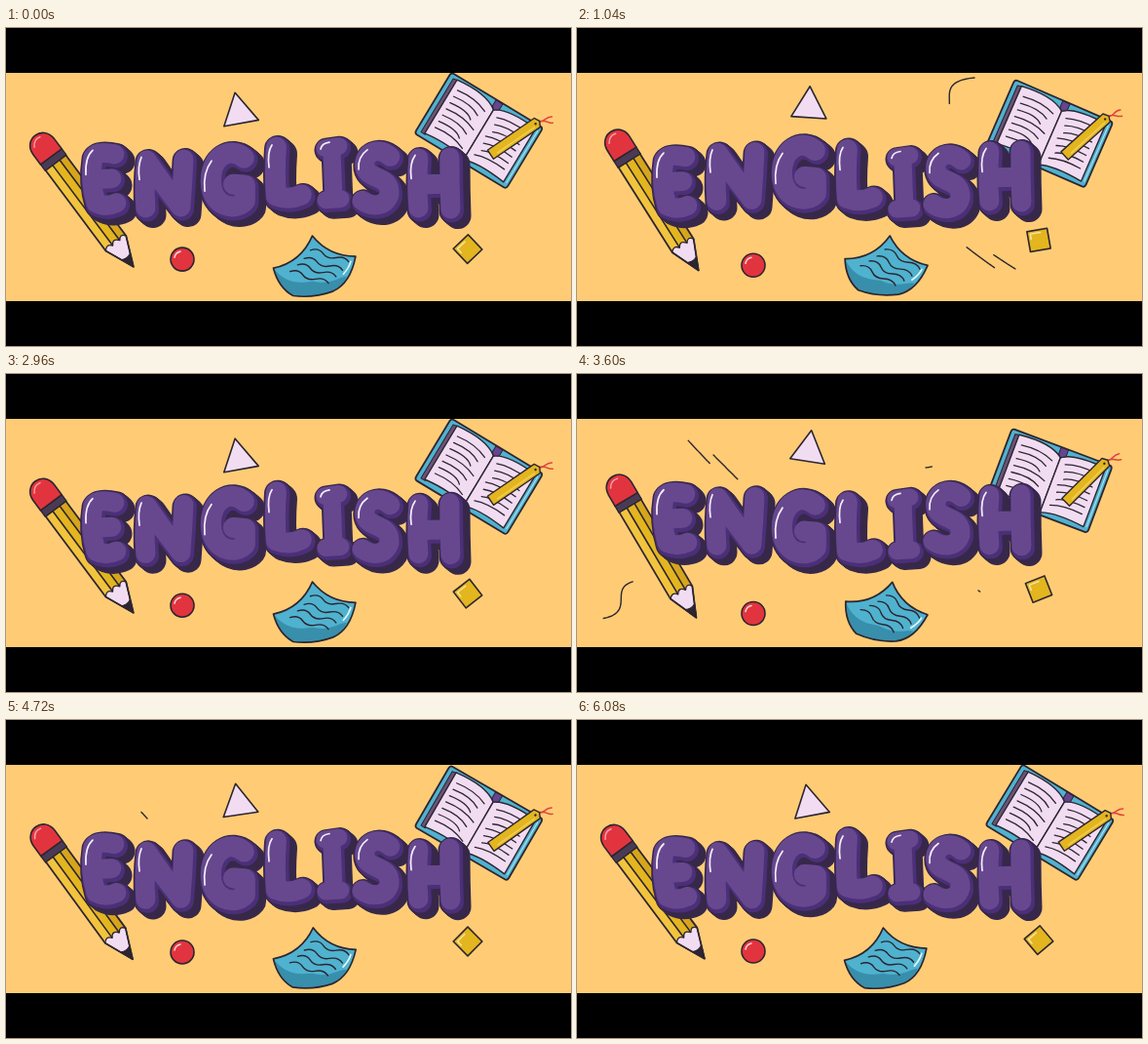
These frames come from a looping animation (580x326 px, 6160 ms). An HTML page with a canvas:

```html
<!DOCTYPE html>
<html lang="en">
<head>
<meta charset="utf-8">
<title>English</title>
<style>
html, body { margin: 0; width: 100%; height: 100%; overflow: hidden; background: #000; }
canvas { display: block; width: 580px; height: 326px; }
</style>
</head>
<body>
<canvas id="stage" width="580" height="326"></canvas>
<script>
const ctx = document.getElementById('stage').getContext('2d');
const LOOP = 6160, CYCLE = LOOP / 4, STEP = 80, TAU = Math.PI * 2;
const INK = '#2d2530', PAGE = '#f1dcf2', BLUE = '#4fb2cf', YELLOW = '#e3b51f';

const wave = x => Math.cos(TAU * x);
const clamp = x => Math.max(0, Math.min(1, x));

function shape(d, fill, stroke, width = 1.6) {
  const path = new Path2D(d);
  if (fill) { ctx.fillStyle = fill; ctx.fill(path); }
  if (stroke) { ctx.strokeStyle = stroke; ctx.lineWidth = width; ctx.stroke(path); }
}

// Draw in a moved and turned coordinate system.
function at(x, y, deg, draw) {
  ctx.save();
  ctx.translate(x, y);
  ctx.rotate(deg * Math.PI / 180);
  draw();
  ctx.restore();
}

// Bubble letters: strokes, highlight, stroke width.
const letters = [
  ['M113 130Q95 126 91 133Q87 157 94 180Q104 185 115 180M92 156L110 155', 'M82 149Q81 131 89 124', 24],
  ['M145 181Q143 155 146 132Q162 156 181 180Q183 156 184 131', 'M137 150Q135 136 139 127', 24],
  ['M246 133C231 120 212 132 212 156C212 184 238 188 247 177L247 161L235 160', 'M204 165Q202 146 211 134', 25],
  ['M279 128Q277 154 279 178Q292 183 305 177', 'M270 147Q268 131 273 124', 25],
  ['M329 130L343 128M336 130L338 180M330 183L345 182', 'M323 129Q324 123 332 122', 22],
  ['M396 133C383 121 368 130 370 143C373 158 397 151 395 172C391 186 375 184 367 178', 'M362 144Q361 131 371 124', 24],
  ['M425 130Q423 155 425 181M457 129Q457 155 458 182M425 157L457 156', 'M416 149Q414 133 420 125', 24]
];

function letter([d, shine, w], dy) {
  ctx.save();
  ctx.translate(0, dy);
  const path = new Path2D(d);
  const layer = (color, width, x, y) => {
    ctx.save();
    ctx.translate(x, y);
    ctx.strokeStyle = color;
    ctx.lineWidth = width;
    ctx.stroke(path);
    ctx.restore();
  };
  for (let i = 0; i <= 6; i++) layer('#37284a', w + 3, i, i * 0.85);
  layer('#4b2f78', w, 0, 0);
  layer('#67488f', w - 4, -1.6, -2);
  shape(shine, null, '#f6eefb', 1.7);
  ctx.restore();
}

function pencil() {
  shape('M-50 -13L54 -13L84 0L54 13L-50 13Z', YELLOW);
  shape('M-50 4H54V13H-50Z', '#f2c43d');
  shape('M-50 -13H54V-6H-50Z', '#d6a51b');
  shape('M54 -13L84 0L54 13Q48 8 54 4Q47 0 54 -5Q48 -9 54 -13Z', PAGE, INK, 1.3);
  shape('M71 -5.5L84 0L71 5.5Q74 0 71 -5.5Z', INK, INK, 1);
  shape('M-50 -5H53M-50 4H53', null, INK, 1.6);
  shape('M-50 -13L54 -13L84 0L54 13L-50 13Z', null, INK, 1.8);
  shape('M-57 -13.5H-49V13.5H-57Z', '#4a3b55', INK, 1.4);
  shape('M-57 -13.5H-70C-89 -13 -89 13 -70 13.5H-57Z', '#e2343f', INK, 1.6);
  shape('M-75 8Q-82 4 -80 -3', null, '#f6a3a5', 1.5);
}

function book() {
  shape('M-52 -36.5H52Q55 -36.5 55 -33V33Q55 36.5 52 36.5H-52Q-55 36.5 -55 33V-33Q-55 -36.5 -52 -36.5Z', BLUE, INK, 1.8);
  shape('M-50 -32L-45 -33V32H-50Z', '#6b5378', INK, 1);
  shape('M2 -26Q-12 -37 -46 -33V31Q-14 27 2 34Z', PAGE, INK, 1.4);
  shape('M2 -26Q14 -35 49 -32V32Q16 28 2 34Z', PAGE, INK, 1.4);
  shape('M-1 -36H7V-29L2 -26L-1 -29Z', '#65458f', INK, 1);
  for (let i = 0; i < 7; i++) {
    const y = -24 + i * 7.4, cut = i % 3 * 4;
    shape(`M-40 ${y}Q-20 ${y - 3} ${-5 - cut} ${y + 4}`, null, INK, 1.3);
    shape(`M${9 + cut / 2} ${y + 3}Q22 ${y - 2} 43 ${y}`, null, INK, 1.3);
  }
  shape('M52 31V-31', null, '#b8e5ee', 1);
  shape('M48 -40C53 -41 51 -48 57 -51M48 -40C53 -46 56 -42 61 -46', null, '#df443e', 1.5);
  at(35.5, -12.5, 114.5, () => {
    shape('M-28 -5.5H30V5.5H-28L-31 0Z', YELLOW, INK, 1.4);
    shape('M-23 -2.5H23', null, '#f2ce55', 1.5);
    ctx.beginPath();
    ctx.arc(-26, 0, 1.2, 0, TAU);
    ctx.fillStyle = INK;
    ctx.fill();
  });
}

function sheet() {
  const outline = 'M-43 -7Q-14 -7 3 -31Q15 -7 42 -1Q31 25 12 29Q-9 32 -29 25Q-42 14 -43 -7Z';
  shape(outline, BLUE);
  shape('M-43 -7Q-34 12 -13 14Q14 18 29 17Q22 28 8 29.5Q-14 31 -29 25Q-42 14 -43 -7Z', '#388fac');
  shape('M-30 3Q-15 10 -8 14Q11 24 33 13L42 -1Q15 -7 3 -31Q-12 -9 -30 3Z', BLUE);
  for (const [x, y] of [[-27, 0], [-18, -5], [-10, -10], [-2, -17]])
    shape(`M${x} ${y}q9 -1 12 6t12 7t12 7`, null, INK, 1.4);
  shape(outline, null, INK, 1.7);
  shape('M26 14Q33 9 36 3', null, '#e4f6fa', 1.7);
}

function ball() {
  ctx.beginPath();
  ctx.arc(0, 0, 12, 0, TAU);
  ctx.fillStyle = '#e2343f';
  ctx.fill();
  ctx.strokeStyle = INK;
  ctx.lineWidth = 1.6;
  ctx.stroke();
  shape('M-8 -2Q-7 -7 -2 -8', null, '#fbd0d0', 1.6);
}

function tile() {
  shape('M-10.5 -10.5H10.5V10.5H-10.5Z', YELLOW, INK, 1.6);
  shape('M-7.5 -2V-7.5H3', null, '#f9e39a', 1.5);
}

// Motion marks: bezier points, cycle offset.
const marks = [
  [[70, 211, 20, 214, 72, 248, 16, 252], 0.10],
  [[145, 101, 135, 90, 124, 79, 114, 68], 0.03],
  [[166, 109, 155, 98, 145, 88, 134, 77], 0.15],
  [[358, 96, 408, 90, 356, 56, 408, 51], 0.33],
  [[391, 218, 403, 227, 416, 237, 429, 246], 0.38],
  [[412, 222, 424, 230, 437, 239, 450, 247], 0.33]
];

function mark([b, start], phase) {
  const u = phase - start;
  const head = 1 - (1 - clamp(u / 0.33)) ** 2;
  const tail = clamp((u - 0.1) / 0.35) ** 2.4;
  if (head - tail < 0.01) return;
  const point = (s, k) => {
    const r = 1 - s;
    return r * r * r * b[k] + 3 * r * r * s * b[k + 2] + 3 * r * s * s * b[k + 4] + s * s * s * b[k + 6];
  };
  ctx.beginPath();
  for (let i = 0; i <= 24; i++) {
    const s = tail + (head - tail) * i / 24;
    ctx.lineTo(point(s, 0), point(s, 1));
  }
  ctx.strokeStyle = INK;
  ctx.lineWidth = 1.4;
  ctx.stroke();
}

function draw(ms) {
  const phase = ms % CYCLE / CYCLE;
  const c = wave(phase + 0.035), late = wave(phase - 0.06), rest = c + 0.2;

  ctx.fillStyle = '#000';
  ctx.fillRect(0, 0, 580, 326);
  ctx.save();
  ctx.beginPath();
  ctx.rect(0, 46, 580, 234);
  ctx.clip();
  ctx.fillStyle = '#ffcc75';
  ctx.fillRect(0, 46, 580, 234);
  ctx.lineCap = ctx.lineJoin = 'round';

  marks.forEach(m => mark(m, phase));
  at(80 + 0.5 * c, 177.5, 56.8 - 3.7 * c, pencil);
  at(485.3, 107.6 - 2.5 * c, 25 + 6.3 * c, book);
  at(238.7 + 0.9 * c, 81.5 + 4.9 * rest, -11.4 * rest,
    () => shape('M.5 -21.5L-18.5 9.5L17.5 11.5Z', PAGE, INK, 1.6));
  at(181, 242 - 5 * c, 0, ball);
  at(474, 221.5 + 5.5 * late, -25 - 20 * late, tile);
  at(318, 244, -10.3 * rest, sheet);
  letters.forEach((l, i) => letter(l, -5.5 * wave(phase - 0.29 - i * 0.197)));
  ctx.restore();
}

const begin = performance.now();
function frame() {
  const t = (performance.now() - begin) % LOOP;
  draw(Math.floor(t / STEP) * STEP);
  requestAnimationFrame(frame);
}
frame();
</script>
</body>
</html>
```
